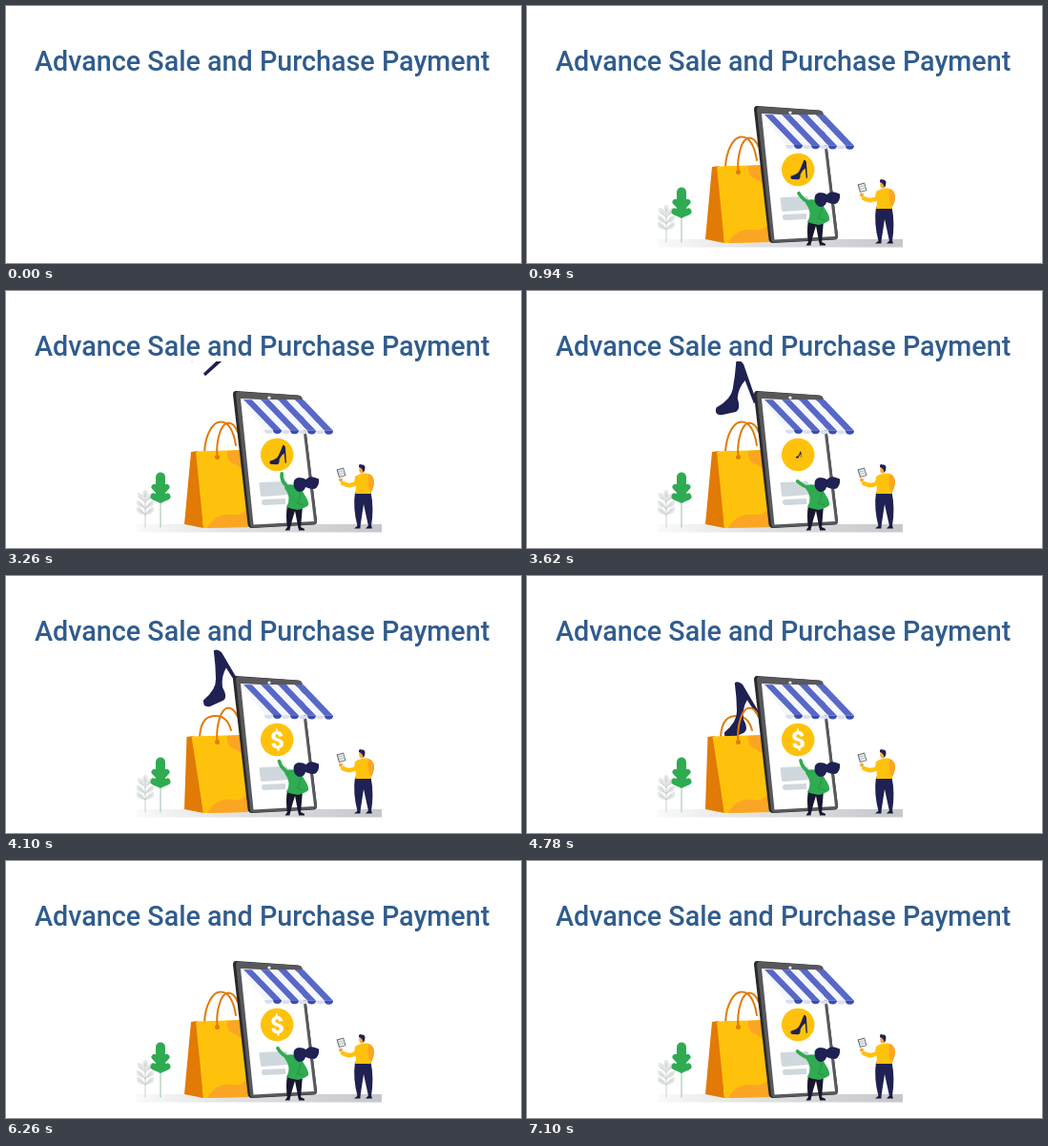
These frames come from a looping animation (540x270 px, 7140 ms). An HTML page with a canvas:

```html
<!DOCTYPE html>
<html lang="en">
<head>
<meta charset="utf-8">
<title>Advance Sale and Purchase Payment</title>
<style>
  html, body { margin: 0; width: 100%; height: 100%; overflow: hidden; background: #fff; }
  canvas { position: absolute; left: 0; top: 0; }
  h1 {
    position: absolute; left: 30px; top: 38px; margin: 0;
    font: 500 28.7px/40px Roboto, Arial, sans-serif;
    color: #305c8d; white-space: nowrap;
  }
</style>
</head>
<body>
<canvas id="stage" width="540" height="270"></canvas>
<h1>Advance Sale and Purchase Payment</h1>
<script>
const ctx = document.getElementById('stage').getContext('2d');
const LOOP = 7140, START = 100, STEP = 40;
const NAVY = '#1f2153', YELLOW = '#ffc20c', AMBER = '#fba524', ORANGE = '#e27a06', GREEN = '#2fab51', INK = '#17172e';
const SHOE = new Path2D('M4.2 -9.9 Q6 -10 6.6 -7.5 L6.2 9.3 H4.9 L4.8 -1 Q1 1 -.8 5 Q-1 9.8 -3.5 10 L-9.5 9.2 Q-12.5 8 -10.5 5.5 Q-3.5 4.5 -1.3 .6 Q1.5 -4 4.2 -9.9 Z');

const clamp = v => Math.min(1, Math.max(0, v));
const ease = v => v * v * (3 - 2 * v);
const ramp = (t, a, b) => ease(clamp((t - a) / (b - a)));
const mix = (a, b, k) => a + (b - a) * k;

function fill(color, d) {
  ctx.fillStyle = color;
  ctx.fill(new Path2D(d));
}
function line(color, width, d) {
  ctx.strokeStyle = color;
  ctx.lineWidth = width;
  ctx.stroke(new Path2D(d));
}
function dot(color, x, y, rx, ry = rx) {
  ctx.fillStyle = color;
  ctx.beginPath();
  ctx.ellipse(x, y, rx, ry, 0, 0, 7);
  ctx.fill();
}
function shoe(x, y, size, turn) {
  ctx.save();
  ctx.translate(x, y);
  ctx.rotate(turn * Math.PI / 180);
  ctx.scale(size, size);
  ctx.fillStyle = NAVY;
  ctx.fill(SHOE);
  ctx.restore();
}

function ground() {
  const g = ctx.createLinearGradient(137, 0, 394, 0);
  g.addColorStop(0, '#fafafa');
  g.addColorStop(0.35, '#e4e4e6');
  g.addColorStop(1, '#c6c7cc');
  ctx.fillStyle = g;
  ctx.fillRect(137, 245, 257, 8.5);
}

function plants() {
  for (const [y, w] of [[217, 5], [225, 6], [232, 6]]) {
    fill('#e2e7e5', `M146 ${y + 3} q-${w + 4} 0 -${w + 3} -8 q6 0 ${w + 3} 8 q${w - 3} -8 ${w + 3} -8 q1 8 -${w + 3} 8`);
  }
  dot('#e2e7e5', 146, 213, 2.6, 4);
  line('#bcc4c1', 0.8, 'M146 248 V213 M146 222 l-5 -5 M146 222 l5 -5 M146 229 l-6 -6 M146 229 l6 -6 M146 235 l-6 -5 M146 235 l6 -5');

  line('#a9cdb3', 1.2, 'M162 248 V220');
  line(GREEN, 10, 'M162 195.5 V216');
  line(GREEN, 6, 'M162 213 L155.5 206 M162 213 L168.5 206');
  line(GREEN, 7, 'M162 219 L155 216 M162 219 L169 216');
}

function fallingShoe(t) {
  if (t < 3140 || t > 5100) return;
  const keys = [[3140, 216, 40, 60], [3260, 215.5, 62, 47], [3420, 203, 82, 26], [3700, 222, 105, -32]];
  let [, x, y, turn] = keys[3];
  const i = keys.findIndex(k => k[0] > t);
  if (i > 0) {
    const a = keys[i - 1], b = keys[i];
    const u = (t - a[0]) / (b[0] - a[0]);
    const k = i === 3 ? ease(u) : u;
    [x, y, turn] = [1, 2, 3].map(n => mix(a[n], b[n], k));
  }
  y += 105 * Math.pow(clamp((t - 4440) / 600), 2);
  shoe(x, y, 2.5, turn);
}

function bag(t) {
  const open = ramp(t, 3700, 3980) * (1 - ramp(t, 5140, 5600));
  const left = 194 - 4.5 * open, hx = -5 * open, top = mix(137.5, 147, open);
  line(ORANGE, 2, `M${208 + hx} 170 C${209 + hx} 150 ${217 + hx} ${top} ${225 + hx} ${top} Q${237 + hx} ${top} ${241 + hx} 162`);
  fallingShoe(t);
  fill(ORANGE, `M${left} 169 L${left + 7} 168 L207 249 L187 245 Z`);
  fill(YELLOW, `M${left + 5} 168.5 L247 167 L254 248 L207 249 Z`);
  fill(AMBER, 'M211 249 Q220 233 236 235 Q247 237 254 228 V248 Z');
  fill(AMBER, 'M232 168 L247 167 L250 190 Q243 182 237 181 Q231 177 232 168 Z');
  line(ORANGE, 2, 'M221.5 174 C220 158 225 139 233 138.5 Q239 138.5 243 148');
  dot(ORANGE, 221.5, 174.5, 2.5);
}

function tablet() {
  fill('#29292b', 'M241 105 L306 109.5 Q310 110 310.5 113 L326 241 Q326.5 245 323 245.5 L258 249 Q254 249 253.5 245 L238 109 Q238 105 241 105 Z');
  fill('#58595c', 'M244 105.8 L307 109.8 Q310 110 310.5 113 L326 241 Q326 244.5 323 245 L259 248.5 Q256.5 248.5 256 245.5 L241 109 Q241 105.8 244 105.8 Z');
  fill('#fff', 'M246 113 L308 116 L323 242 L259.5 245.5 Z');
  dot('#fff', 276, 112, 1.6);
}

function awning() {
  for (let i = 0; i < 8; i++) {
    const top = Math.max(246.5, 240 + 9 * i), end = 249 + 9 * i, low = 271 + 9 * i;
    const y = 146 + i * 0.1, blue = i % 2;
    fill(blue ? '#5768c6' : '#f5f7fe', `M${top} 114 L${end} 114.3 L${low + 9} ${y} L${low} ${y} Z`);
    fill(blue ? '#3c4db0' : '#d9def4', `M${low} ${y} h9 q0 4 -4.5 4 q-4.5 0 -4.5 -4 Z`);
  }
}

function screen(t) {
  dot(YELLOW, 284.2, 172, 17.3);
  const icon = 1 - ramp(t, 3500, 3700) + ramp(t, 6620, 6860);
  const cash = ramp(t, 3700, 3900) - ramp(t, 6260, 6500);
  if (icon > 0) shoe(284.5 + 2.5 * icon, 172, icon, -5);
  if (cash > 0) {
    ctx.save();
    ctx.translate(284.3, 172);
    ctx.rotate(-0.1);
    ctx.scale(cash, cash);
    ctx.fillStyle = '#fff';
    ctx.font = '900 25px Roboto, Arial, sans-serif';
    ctx.textAlign = 'center';
    ctx.fillText('$', 0, 9);
    ctx.restore();
  }
  fill('#cfd8dc', 'M267 201 L293 200 Q295 200 295 202 L296 214 L269 216 Q267 216 267 214 L265.5 203 Q265.5 201 267 201 Z');
  fill('#cfd8dc', 'M270 219 L293 218 V224 L271 225 Q268 225 268 222 Q268 219 270 219 Z');
}

function woman(t) {
  const lift = (1 - Math.cos((t - START) / 700 * 2 * Math.PI)) / 2;
  const angle = mix(196, 234, lift) * Math.PI / 180;
  const hx = 298 + 15 * Math.cos(angle), hy = 204 + 15 * Math.sin(angle);
  fill(INK, 'M295 225 H311 Q310 237 309 249 H306.5 L303 231 Q300 240 298 249 H295 Q293 236 295 225 Z');
  fill(INK, 'M295 248 H298 L297.5 251.5 H292.5 Z M306.5 248 H309 L313 250 V251.5 H307 Z');
  line(GREEN, 3.6, `M${hx} ${hy} Q${mix(290, 288, lift)} ${mix(206, 202, lift)} 299 208`);
  fill(GREEN, 'M293 204 Q300 202 307 205 Q311 209 313 214 Q318 221 317 225 Q314 228 306 230 Q299 229 294 227 Q300 217 292 207 Z');
  line('#218f41', 0.8, 'M309 212 Q309 219 305 223 L312 225');
  fill(NAVY, 'M301.5 203 Q301 197 307 196 Q312 196 314.5 198 Q318 194 324 196 L328 197.5 Q329 206 323 208 Q318 208 314 206 Q313 211 307 211 Q302 209 301.5 203 Z');
}

function man() {
  fill(NAVY, 'M366 211 L382.5 211 Q386 228 383 247 H380 L375 224 L371.5 247 H368.5 Q363.5 228 366 211 Z');
  fill(INK, 'M368.5 246.5 H371.5 V249.5 H365 Q367 247.5 368.5 247 Z M380 246.5 H383 L384 249.5 H377 Z');
  line(YELLOW, 4.5, 'M369 200 Q362 207 353 202');
  dot('#f6a43b', 351, 198.5, 2);
  fill(YELLOW, 'M366 195 Q371 191 379 191.5 Q386 194 386 201 Q385 208 382.5 213 L366 213 Q368 206 365 201 Z');
  fill(AMBER, 'M380 192 Q386 194 386 201 Q386 207 382 211 Q379 205 380 192 Z');
  dot('#f6a43b', 373, 187.5, 2.7, 4);
  fill(NAVY, 'M370 184 Q370 181 373 182.5 Q376.5 182 376.5 186 Q376.5 189 374.5 190.5 Q374 186 370 185 Z');
  fill('#6c7378', 'M346.5 187.5 L354 185.5 L356.5 194 L349 196 Z');
  fill('#eef1f2', 'M348 188.3 L353.5 186.8 L355.3 193.4 L349.8 194.8 Z');
  line('#9ba3a8', 0.7, 'M349.3 190 l4 -1 M350 192.3 l4 -1');
}

function draw(t) {
  ctx.clearRect(0, 0, 540, 270);
  if (t < START) return;
  t = START + Math.floor((t - START) / STEP) * STEP;
  ctx.save();
  ctx.beginPath();
  ctx.rect(0, 74, 540, 196);
  ctx.clip();
  ctx.lineCap = 'round';
  ground();
  plants();
  bag(t);
  tablet();
  screen(t);
  awning();
  woman(t);
  man();
  ctx.restore();
}

const begin = performance.now();
function frame() {
  draw((performance.now() - begin) % LOOP);
  requestAnimationFrame(frame);
}
frame();
</script>
</body>
</html>
```
